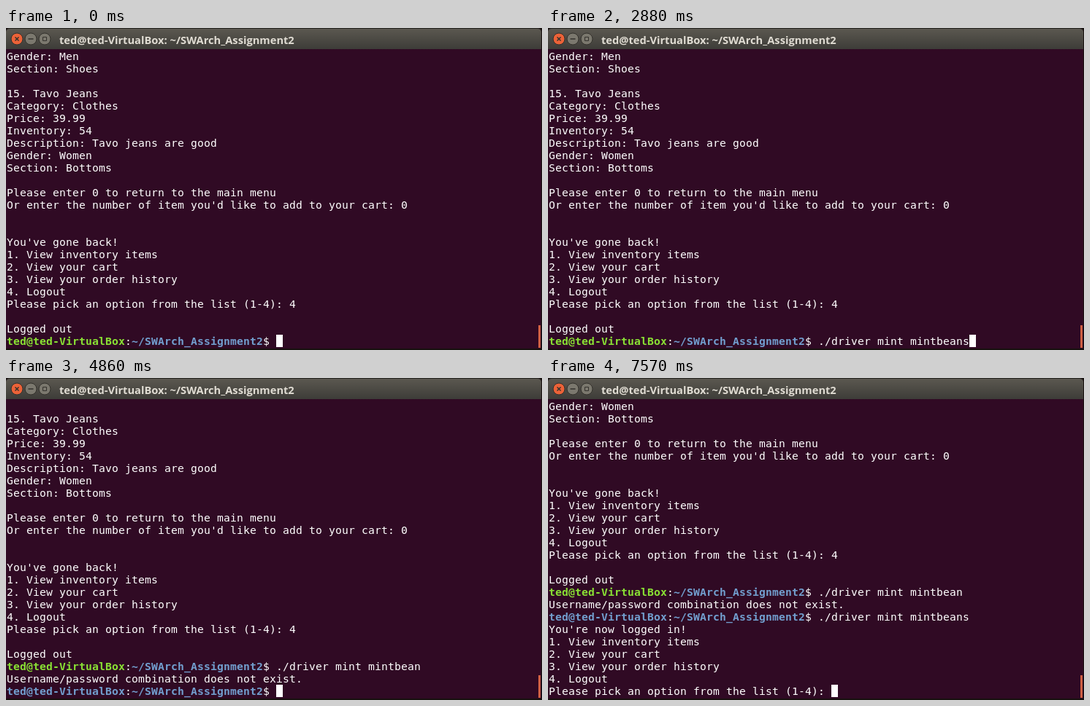
An HTML page that plays this animation: 734 by 442 pixels, repeating every 8 s.

```html
<!DOCTYPE html>
<html lang="en">
<head>
<meta charset="utf-8">
<title>Terminal session</title>
<style>
  html, body { margin: 0; width: 100%; height: 100%; overflow: hidden; background: #300a24; }
  #stage { position: relative; width: 734px; height: 442px; overflow: hidden; background: #300a24; }
  #stage > * { position: absolute; }
  #bar {
    left: 0; top: 0; width: 733px; height: 29px; box-sizing: border-box;
    background: linear-gradient(#5b5850, #3d3c38); border-top: 1px solid #24231f;
    border-radius: 5px 5px 0 0; box-shadow: 0 0 0 6px #15110f; clip-path: inset(0);
  }
  #title {
    left: 73px; top: 6px; line-height: 20px; white-space: pre;
    font: bold 11pt/20px "Open Sans", "Noto Sans", sans-serif; color: #dfdbd2;
  }
  #screen {
    left: 1px; top: 30px; margin: 0; color: #fff;
    font: 11pt/17px "DejaVu Sans Mono", monospace; letter-spacing: calc(9px - 1ch);
    font-variant-ligatures: none;
  }
  #screen b { color: #8ae234; }
  #screen b + b { color: #729fcf; }
  #screen i { background: #fff; }
  #scroll { left: 729px; top: 408px; width: 3px; height: 31px; background: #cf5f43; }
  #bottom { left: 0; top: 440px; width: 734px; height: 2px; background: #17110f; }
  #right { left: 733px; top: 0; width: 1px; height: 442px; background: #17110f; }
  svg { left: 0; top: 0; fill: none; }
</style>
</head>
<body>
<div id="stage">
  <div id="bar"></div>
  <div id="title">ted@ted-VirtualBox: ~/SWArch_Assignment2</div>
  <pre id="screen"></pre>
  <div id="scroll"></div>
  <div id="bottom"></div>
  <div id="right"></div>
  <svg width="734" height="442">
    <g stroke="#33312c">
      <circle cx="15" cy="15" r="8" fill="#ec6238"/>
      <circle cx="34" cy="15" r="8" fill="#7b786e"/>
      <circle cx="53" cy="15" r="8" fill="#7b786e"/>
      <path stroke-width="1.5" d="M12.5 12.5l5 5m0-5l-5 5M30.5 15h7"/>
      <path d="M50.5 12.5h5v5h-5z"/>
    </g>
    <g id="mouse">
      <path id="beam" stroke="#111" stroke-width="3" d="M1.5 1.5h1l1 1l1-1h1M3.5 2.5v11M1.5 14.5h1l1-1l1 1h1"/>
      <use href="#beam" style="display:none"/>
      <path stroke="#eee" d="M1 1.5h1.5l1 1l1-1h1.5M3.5 2.5v11M1 14.5h1.5l1-1l1 1h1.5"/>
    </g>
  </svg>
</div>
<script>
const LOOP = 8000, ROWS = 24;
const screen = document.getElementById("screen");
const mouse = document.getElementById("mouse");

const menu = `1. View inventory items
2. View your cart
3. View your order history
4. Logout
Please pick an option from the list (1-4): `;

const history = `Gender: Men
Section: Shoes

15. Tavo Jeans
Category: Clothes
Price: 39.99
Inventory: 54
Description: Tavo jeans are good
Gender: Women
Section: Bottoms

Please enter 0 to return to the main menu
Or enter the number of item you'd like to add to your cart: 0


You've gone back!
${menu}4

Logged out
`;

const prompt = "<b>ted@ted-VirtualBox</b>:<b>~/SWArch_Assignment2</b>$ ";
const wrong = "./driver mint mintbean", right = wrong + "s";
const failed = history + prompt + wrong + "\nUsername/password combination does not exist.\n";
const loggedIn = failed + prompt + right + "\nYou're now logged in!\n" + menu;
const block = "<i> </i>";

// [start time, terminal contents]
const views = [
  [0, history + prompt + block],
  [2880, history + prompt + right + block],
  [3440, history + prompt + "make" + block],
  [3900, history + prompt + right + block],
  [4300, history + prompt + wrong + block],
  [4860, failed + prompt + block],
  [5430, failed + prompt],
  [5990, failed + prompt + block],
  [6580, failed + prompt + wrong + block],
  [7140, failed + prompt + right + block],
  [7570, loggedIn + block],
];

// [start time, x, y]; without a position the pointer is hidden
const pointer = [
  [0], [850, 353, 430], [1000, 206, 373], [1150],
  [2110, 198, 418], [2230, 300, 414], [2350, 399, 410], [2880],
];

const at = (steps, t) => steps.findLast(step => step[0] <= t);
let shown;

function draw() {
  const t = performance.now() % LOOP;
  const view = at(views, t);
  if (view !== shown) {
    screen.innerHTML = view[1].split("\n").slice(-ROWS).join("\n");
    shown = view;
  }
  const [, x, y] = at(pointer, t);
  mouse.style.display = x === undefined ? "none" : "";
  if (x !== undefined) mouse.setAttribute("transform", `translate(${x} ${y})`);
  requestAnimationFrame(draw);
}
draw();
</script>
</body>
</html>
```
